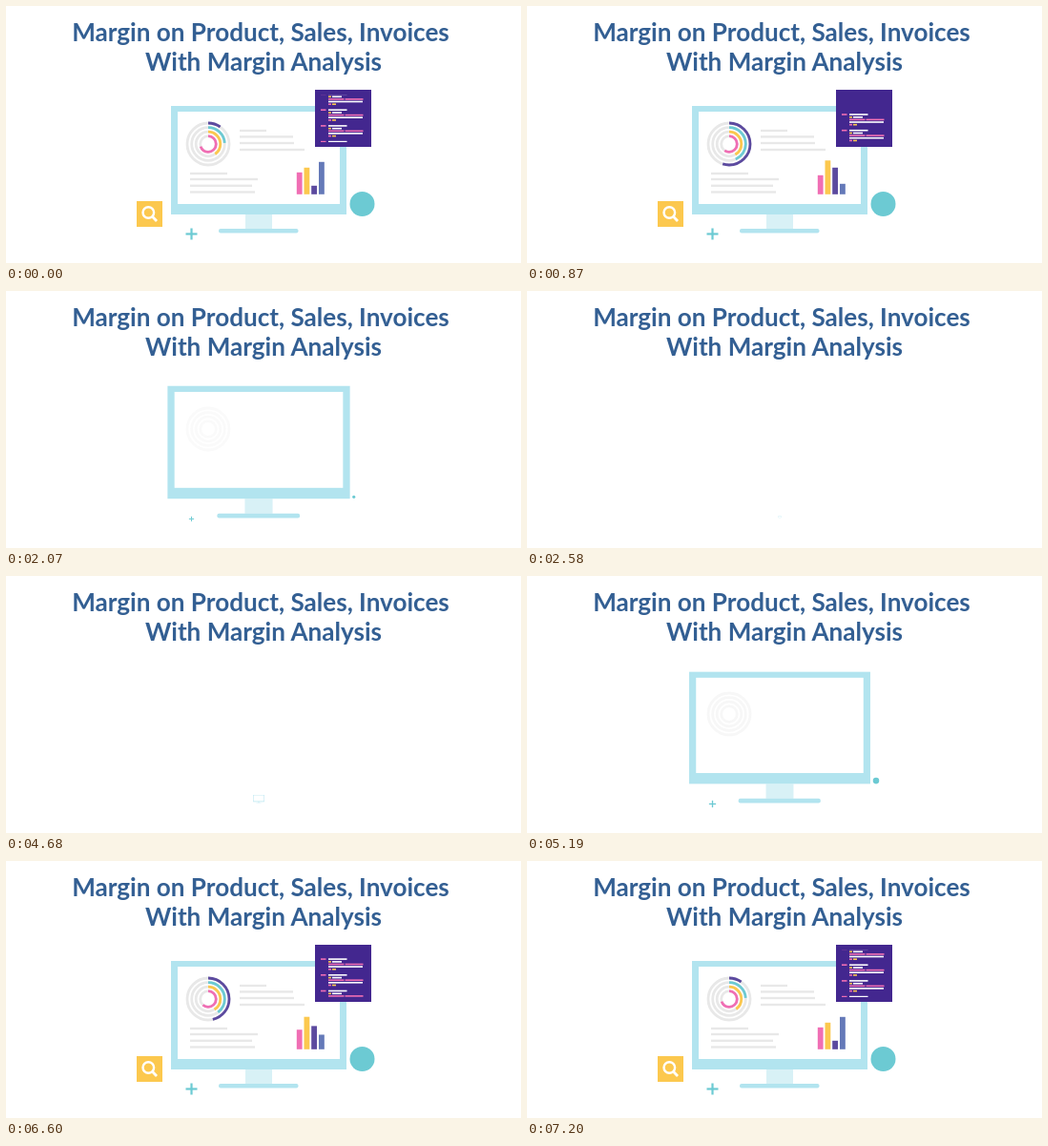
Recreate the animation shown at these times as an HTML page with a canvas. Size 540x270 px, loop 7.35 s.

```html
<!DOCTYPE html>
<html lang="en">
<head>
<meta charset="utf-8">
<title>Margin analysis</title>
<style>
  html, body { margin: 0; width: 100%; height: 100%; overflow: hidden; background: #fff; }
  canvas, svg { position: absolute; left: 0; top: 0; width: 540px; height: 270px; }
  text { font: 700 26.1px Lato, sans-serif; fill: #335f93; text-anchor: middle; }
</style>
</head>
<body>
<canvas id="scene"></canvas>
<svg viewBox="0 0 540 270">
  <text x="267" y="37">Margin on Product, Sales, Invoices</text>
  <text x="270" y="68">With Margin Analysis</text>
</svg>
<script>
const LOOP = 7350, STEP = 30;
const FRAME = '#b2e4ef', NECK = '#d8f1f6', GRAY = '#e8e8e8', TEAL = '#6ccad3';
const PURPLE = '#43278f', VIOLET = '#5c4a9f', BLUE = '#6479b8', YELLOW = '#fcc84e', PINK = '#f06eb4';

const canvas = document.getElementById('scene');
const ctx = canvas.getContext('2d');
const ratio = window.devicePixelRatio || 1;
canvas.width = 540 * ratio;
canvas.height = 270 * ratio;

const clamp = (v, lo, hi) => Math.min(hi, Math.max(lo, v));
const ease = u => (1 - Math.cos(Math.PI * clamp(u, 0, 1))) / 2;
const linear = u => clamp(u, 0, 1);

// Value at time p on a path of [time, value] keys.
function along(p, keys, curve = ease) {
  let value = keys[0][1];
  for (let i = 1; i < keys.length; i++) {
    const [t0, v0] = keys[i - 1], [t1, v1] = keys[i];
    if (p > t0) value = v0 + (v1 - v0) * curve((p - t0) / (t1 - t0));
  }
  return value;
}

const pop = (p, start) => along(p, [[start, 0], [start + 300, 1.1], [start + 500, 1]]);

function rect(color, x0, y0, x1, y1) {
  ctx.fillStyle = color;
  ctx.fillRect(x0, y0, x1 - x0, y1 - y0);
}

function line(color, width, x0, y0, x1, y1) {
  ctx.strokeStyle = color;
  ctx.lineWidth = width;
  ctx.beginPath();
  ctx.moveTo(x0, y0);
  ctx.lineTo(x1, y1);
  ctx.stroke();
}

function arc(color, width, x, y, r, degrees = 360) {
  ctx.strokeStyle = color;
  ctx.lineWidth = width;
  ctx.beginPath();
  ctx.arc(x, y, r, -Math.PI / 2, (degrees - 90) * Math.PI / 180);
  ctx.stroke();
}

function scaled(x, y, s, draw) {
  if (s <= 0) return;
  ctx.save();
  ctx.translate(x, y);
  ctx.scale(s, s);
  ctx.translate(-x, -y);
  draw();
  ctx.restore();
}

function monitor() {
  rect(NECK, 251, 219, 279, 234);
  ctx.fillStyle = FRAME;
  ctx.beginPath();
  ctx.roundRect(223, 234, 83.5, 4.6, 2);
  ctx.fill();
  rect(FRAME, 173, 105, 357, 219);
  rect('#fff', 180, 111, 350, 208);
}

// Radius, colour, and sweep at the three key times.
const rings = [
  [22, VIOLET, 132, 198, 35],
  [17.3, TEAL, 140, 157, 86],
  [12.8, YELLOW, 150, 150, 145],
  [8.3, PINK, 250, 215, 252]
];

function donut(p) {
  ctx.globalAlpha = along(p, [[450, 0], [750, 1]]);
  for (const [r] of rings) arc(GRAY, 2.8, 212, 145, r);
  ctx.globalAlpha = 1;
  for (const [r, color, a, b, c] of rings) {
    const sweep = along(p, [[840, 0], [1290, a], [1740, b], [2580, c]]);
    if (sweep > 0) arc(color, 2.8, 212, 145, r, sweep);
  }
}

// Left edge, y, overshoot width, resting width.
const copy = [
  [245, 131, 35, 28], [245, 137.4, 62, 56], [245, 144, 57, 57], [245, 151, 68, 68],
  [193, 176, 51, 39], [193, 182, 60, 71], [193, 188.8, 77, 65], [193, 195.5, 76, 68]
];

function copyLines(p) {
  for (const [x, y, wide, rest] of copy) {
    const w = along(p, [[840, 0], [1290, wide], [1560, rest]]);
    if (w > 0) rect(GRAY, x, y - 1.2, x + w, y + 1.2);
  }
}

const bars = [
  [304.8, PINK, 28, 20, 23],
  [312.5, YELLOW, 31, 35.5, 28],
  [320.2, VIOLET, 17, 28, 9],
  [328, BLUE, 19, 11, 34]
];

function chart(p) {
  for (const [x, color, a, b, c] of bars) {
    const h = along(p, [[840, 0], [1290, a], [1740, b], [2580, c]]);
    rect(color, x, 197.8 - h, x + 5.8, 197.8);
  }
}

// Row offset, colour, left and right edge.
const codeRows = [
  [0, PINK, 330, 335.5], [0, '#fff', 338, 357.5],
  [2.8, YELLOW, 338, 341], [2.8, '#fff', 342, 352],
  [5.4, PINK, 338, 354.5], [5.4, PINK, 355.5, 374.5],
  [8, '#fff', 338, 374],
  [10.7, PINK, 338, 341], [10.7, YELLOW, 342, 346]
];

function codePanel(p) {
  rect(PURPLE, 324, 88, 383, 148);
  ctx.beginPath();
  ctx.rect(324, 93.5, 59, 49.5);
  ctx.clip();
  const top = along(p, [[1200, 144], [1290, 139], [1740, 114], [2580, 75.8]], linear);
  for (let y = top; y < 144; y += 16.7) {
    for (const [dy, color, x0, x1] of codeRows) rect(color, x0, y + dy - .8, x1, y + dy + .8);
  }
}

function searchIcon() {
  rect(YELLOW, 137, 205, 164, 232);
  arc('#fff', 2.4, 149.3, 217, 5.8);
  line('#fff', 2.8, 153.5, 221.3, 158, 226);
}

function plus() {
  line(TEAL, 2.2, 188.5, 239.5, 200.5, 239.5);
  line(TEAL, 2.2, 194.5, 233.5, 194.5, 245.5);
}

function badge() {
  ctx.fillStyle = TEAL;
  ctx.beginPath();
  ctx.arc(373.5, 208, 13, 0, 2 * Math.PI);
  ctx.fill();
}

// A small half disc thrown out from the code panel; it lingers while building.
function spark(p, building) {
  if (p < 780 || p > (building ? 1530 : 1050)) return;
  const u = ease((p - 780) / 270);
  ctx.fillStyle = YELLOW;
  ctx.beginPath();
  ctx.arc(340 - 28 * u, 104 - 30 * u, 3, -Math.PI / 2, Math.PI / 2);
  ctx.fill();
}

function render(t) {
  // The scene comes apart, rests empty, then builds again along the same path.
  const p = clamp(Math.max(2610 - t, t - 4620), 30, 2580);
  ctx.setTransform(ratio, 0, 0, ratio, 0, 0);
  rect('#fff', 0, 0, 540, 270);
  scaled(265, 238.5, along(p, [[0, 0], [380, 1.06], [780, 1]]), monitor);
  donut(p);
  copyLines(p);
  chart(p);
  spark(p, t > 4000);
  scaled(353.5, 118, pop(p, 570), () => codePanel(p));
  scaled(150.5, 218.5, pop(p, 570), searchIcon);
  scaled(194.5, 239.5, pop(p, 410), plus);
  scaled(363.5, 217.5, pop(p, 475), badge);
}

const begin = performance.now();
function tick() {
  const t = (performance.now() - begin) % LOOP;
  render(Math.floor(t / STEP) * STEP);
  requestAnimationFrame(tick);
}
tick();
</script>
</body>
</html>
```
